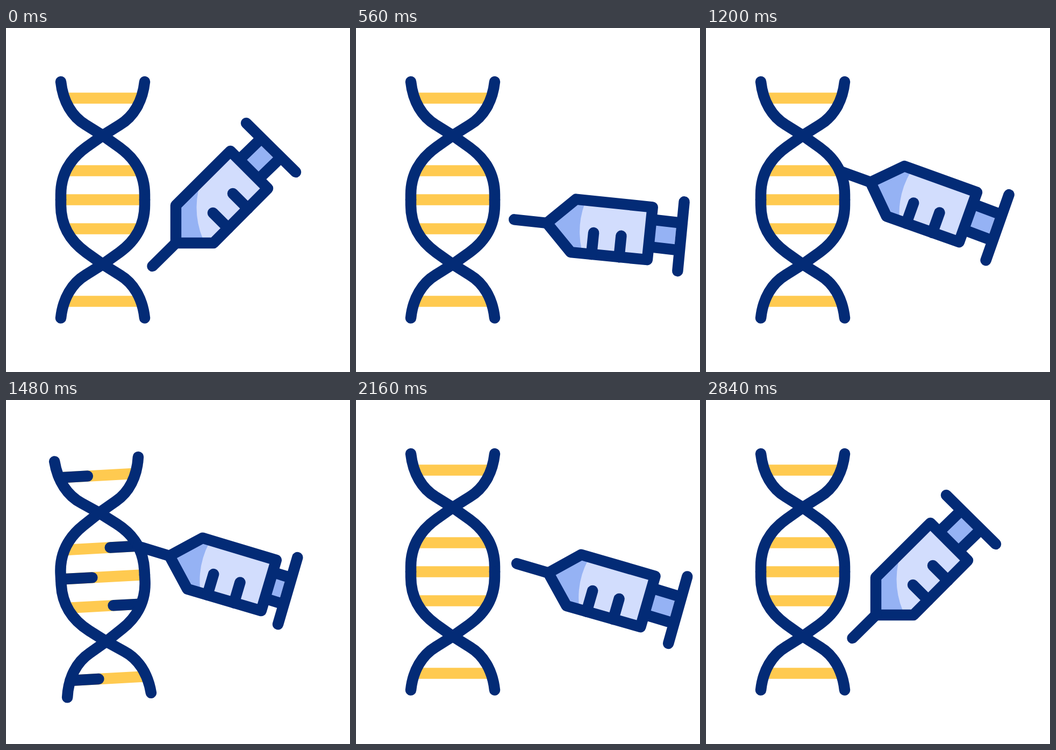
An HTML page that plays this animation: 640x640 px, repeating every 3 s.

```html
<!DOCTYPE html>
<html lang="en">
<head>
<meta charset="utf-8">
<title>DNA and syringe</title>
<style>
  html, body { margin: 0; height: 100%; overflow: hidden; background: #fff; }
  svg { display: block; width: 100vw; height: 100vh; }
  .line { fill: none; stroke: #032b76; stroke-width: 20.5; stroke-linecap: round; stroke-linejoin: round; }
  .rung { stroke: #ffca50; stroke-width: 20.5; }
  .light { fill: #d2ddfd; }
  .mid { fill: #95b2f4; }
</style>
</head>
<body>
<svg viewBox="0 0 640 640">
  <defs>
    <path id="half" d="M102 100C106 137 123 165 148 180L180 200L211 222C243 245 258 275 258 310V320"/>
    <g id="strands">
      <use href="#half"/>
      <use href="#half" transform="translate(360) scale(-1 1)"/>
    </g>
    <path id="body" d="M316 330V400H386L487 298.5L417.5 229Z"/>
    <clipPath id="inside"><use href="#body"/></clipPath>
  </defs>
  <g id="scene">
    <g id="rungs"></g>
    <g class="line">
      <use href="#strands"/>
      <use href="#strands" transform="translate(0 639.6) scale(1 -1)"/>
    </g>
    <g id="syringe">
      <g id="plunger">
        <path class="mid" d="M468 212L432 247L468 283L504 248"/>
        <path class="line" d="M468 212L432 247L468 283L504 248M447 177L539 268"/>
      </g>
      <use href="#body" class="mid"/>
      <g clip-path="url(#inside)">
        <circle id="glass" class="light" cx="504.5" cy="334" r="150"/>
      </g>
      <use href="#body" class="line"/>
      <path class="line" d="M316 400L272.5 443M422 308L450 336M385 344L413.5 372.5"/>
    </g>
  </g>
</svg>
<script>
const LOOP = 3000;
const $ = id => document.getElementById(id);
const transform = (id, value) => $(id).setAttribute("transform", value);

// Eased progress from 0 to 1 between two times
const ease = (t, from, to) => {
  const x = Math.min(1, Math.max(0, (t - from) / (to - from)));
  return x * x * (3 - 2 * x);
};

// Syringe poses: centre x, centre y, rotation, tilt of the liquid
const rest = [405.2, 310.3, 0, 0];
const ready = [488, 381.3, 55.5, -45];
const inserted = [425.2, 329.3, 64.7, -45];
const withdrawn = [480.5, 357, 62, -45];
const moves = [
  [200, 640, ready],
  [690, 1190, inserted],
  [1845, 2110, withdrawn],
  [2110, 2820, rest]
];

function syringePose(t) {
  let pose = rest;
  for (const [from, to, target] of moves) {
    const k = ease(t, from, to);
    pose = pose.map((v, i) => v + (target[i] - v) * k);
  }
  return pose;
}

// Rungs: y, half length, sweep direction
const rungs = [
  [130.5, 71, 1], [265.5, 66, -1], [319.5, 78, 1], [373.5, 66, -1], [508.5, 71, 1]
].map(([y, half, dir]) => {
  const addLine = cls => {
    const line = document.createElementNS("http://www.w3.org/2000/svg", "line");
    line.setAttribute("class", cls);
    line.setAttribute("y1", y);
    line.setAttribute("y2", y);
    $("rungs").append(line);
    return (start, end) => {
      line.setAttribute("x1", 180 + dir * half * (2 * start - 1));
      line.setAttribute("x2", 180 + dir * half * (2 * end - 1));
      line.style.display = end > start ? "" : "none";
    };
  };
  addLine("rung")(0, 1);
  return addLine("line");
});

function draw() {
  const t = performance.now() % LOOP;
  const press = ease(t, 1280, 1680) - ease(t, 1680, 2040);
  const [x, y, turn, tilt] = syringePose(t);
  const shift = press * 42 * Math.SQRT1_2;

  transform("scene", `rotate(${-6.2 * press} 360 324)`);
  transform("plunger", `translate(${-shift} ${shift})`);
  transform("glass", `rotate(${tilt} 367 347)`);
  transform("syringe", `translate(${x} ${y}) rotate(${turn}) translate(${-rest[0]} ${-rest[1]})`);
  rungs.forEach(sweep => sweep(ease(t, 1618, 2018), ease(t, 1315, 1715)));

  requestAnimationFrame(draw);
}
draw();
</script>
</body>
</html>
```
